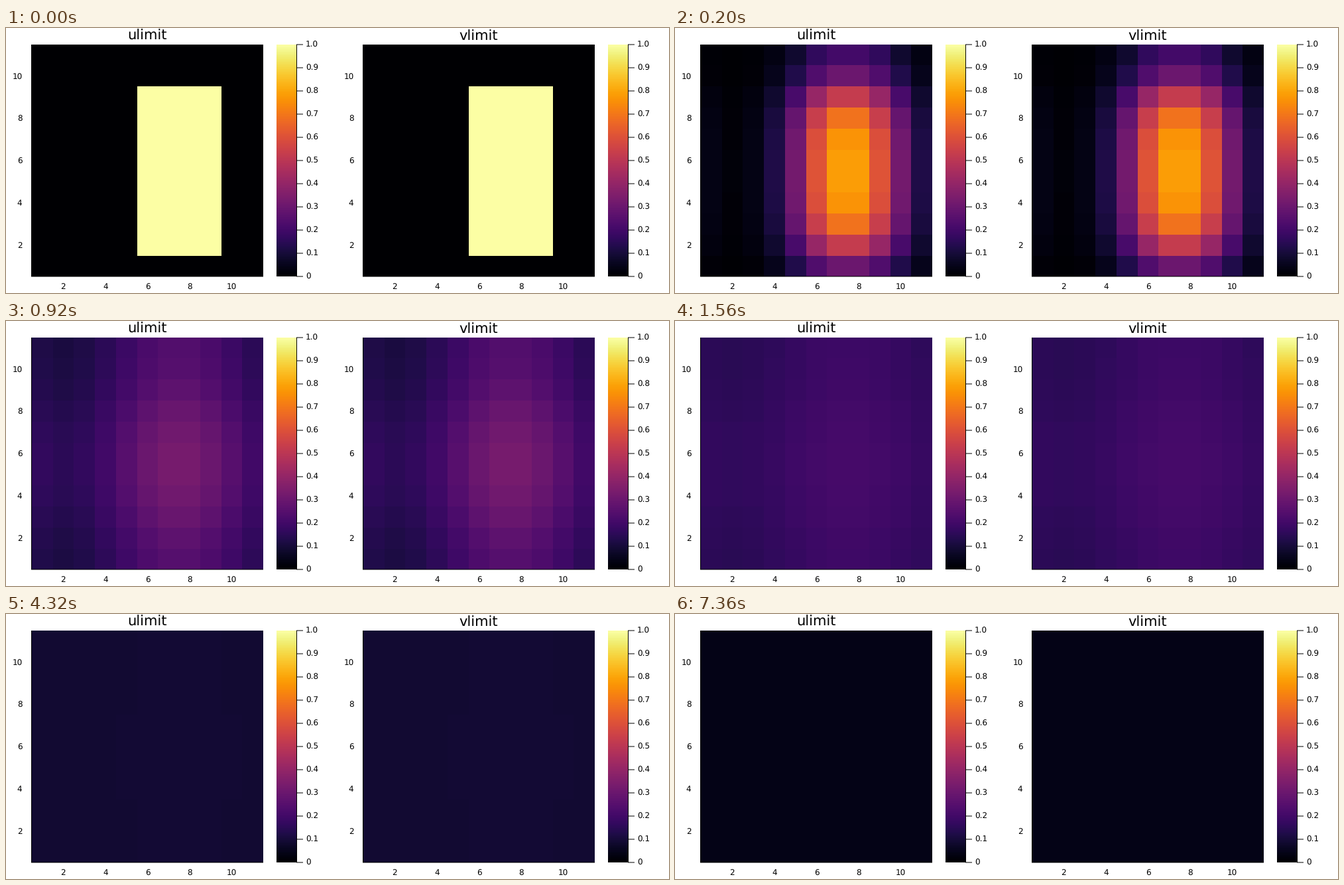
Recreate the animation shown at these times as a matplotlib script. Size 1000x400 px, loop 8040 ms.

```python
import numpy as np
import matplotlib.pyplot as plt
from matplotlib.animation import FuncAnimation
from matplotlib.patches import Rectangle

W, H, DPI = 1000, 400, 100
FRAMES, INTERVAL = 201, 40
N = 11                      # cells per side, periodic grid
SPREAD, DECAY = 0.2, 0.01   # diffusion and loss per step
LEFT, RIGHT, TOP, BOTTOM = 38, 388, 25, 375
CELL = (BOTTOM - TOP) / N
PX = 72 / DPI

plt.rcParams["font.family"] = "DejaVu Sans"
plt.rcParams["text.hinting"] = "no_hinting"
fig = plt.figure(figsize=(W / DPI, H / DPI), dpi=DPI, facecolor="white")
ax = fig.add_axes([0, 0, 1, 1])

rates = 2 - 2 * np.cos(2 * np.pi * np.fft.fftfreq(N))


def block(first, last):
    cells = np.arange(1, N + 1)
    return ((cells >= first) & (cells <= last)).astype(float)


def diffuse(profile, step):
    damping = np.exp(-SPREAD * step * rates)
    return np.fft.ifft(np.fft.fft(profile) * damping).real


def field(step):
    if step == 0:
        return np.outer(block(2, 9), block(6, 9))
    x = diffuse(block(6, 9), step)
    y = diffuse(block(2, 9), step)
    return np.outer(y, x) * np.exp(-DECAY * step)


def image(data, left, right, bottom=BOTTOM, top=TOP):
    return ax.imshow(data, extent=(left, right, bottom, top), origin="lower",
                     cmap="inferno", vmin=0, vmax=1, aspect="auto",
                     interpolation="nearest")


def line(xs, ys):
    ax.plot(xs, ys, color="black", lw=PX, solid_capstyle="butt", snap=False)


def label(x, y, text, ha, size=12):
    ax.text(x, y, text, ha=ha, va="baseline", fontsize=size * PX)


def panel(dx, title):
    # Rows are a whole 32 pixels tall, trimmed to the plot area.
    heat = image(field(0), dx + LEFT + 1, dx + RIGHT, BOTTOM + 1, TOP - 1)
    heat.set_clip_path(Rectangle((dx + LEFT, TOP), RIGHT - LEFT, BOTTOM - TOP,
                                 transform=ax.transData))
    line([dx + LEFT + 0.5] * 2, [TOP, BOTTOM])
    line([dx + LEFT, dx + RIGHT], [BOTTOM] * 2)
    label(dx + 213, 18, title, "center", 21)
    for tick in range(2, N, 2):
        offset = (tick - 0.5) * CELL
        label(dx + LEFT + 0.5 + offset, 394.5, str(tick), "center")
        label(dx + 24.5, BOTTOM - offset + 4.7, str(tick), "right")

    image(np.linspace(0, 1, 256)[:, None], dx + 408, dx + 438)
    line([dx + 438.5] * 2, [TOP, BOTTOM])
    for i in range(11):
        y = BOTTOM - i * (BOTTOM - TOP) / 10
        line([dx + 438, dx + 448], [y, y])
        label(dx + 452, y + 4.2, f"{i / 10:.1f}" if i else "0", "left")
    return heat


heats = [panel(0, "ulimit"), panel(500, "vlimit")]
ax.set_xlim(0, W)
ax.set_ylim(H, 0)
ax.axis("off")


def update(step):
    data = field(step)
    for heat in heats:
        heat.set_data(data)
    return heats


anim = FuncAnimation(fig, update, frames=FRAMES, interval=INTERVAL,
                     repeat=True, repeat_delay=0)
plt.show()
```
